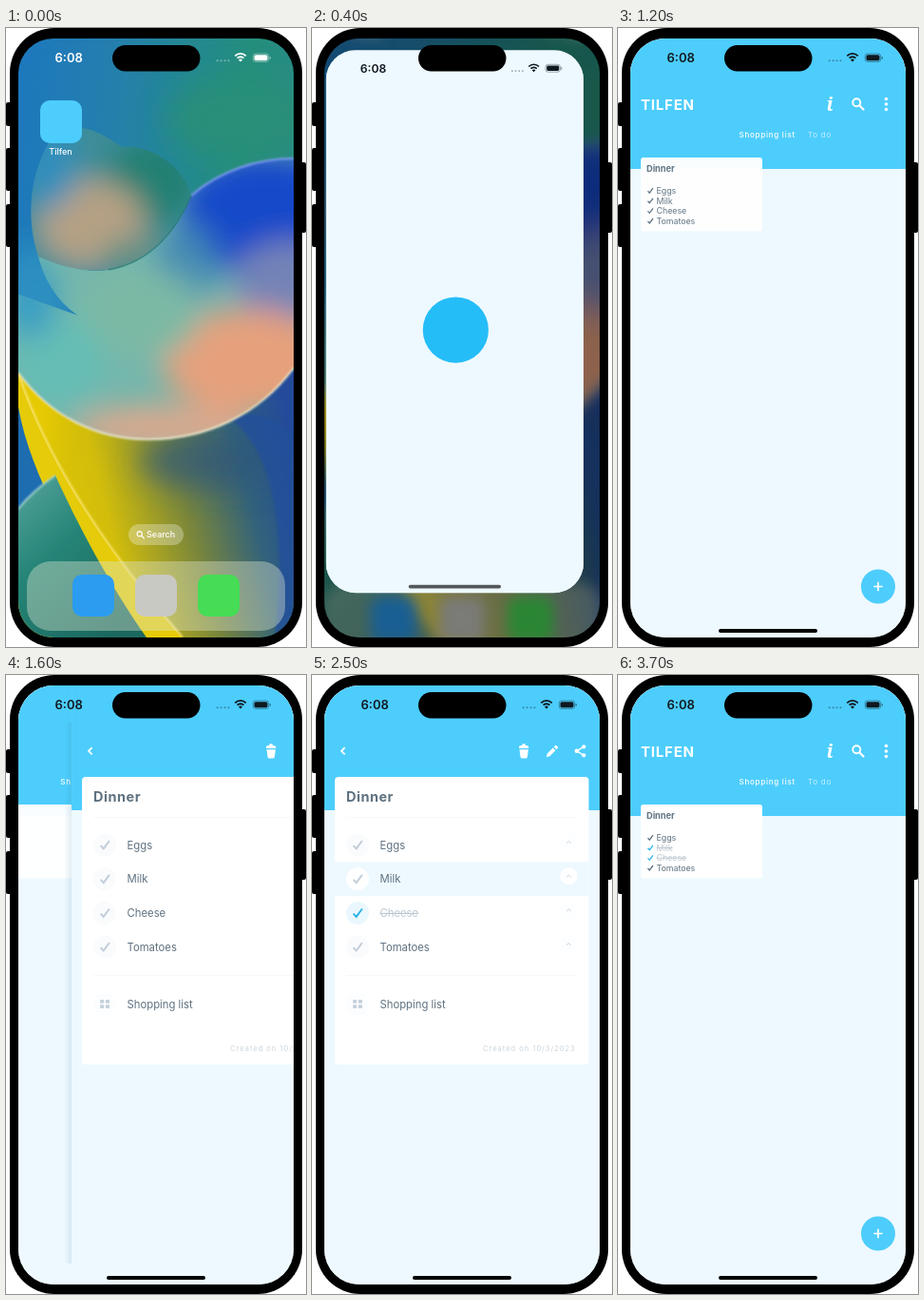
An HTML page that plays this animation: 316 by 650 pixels, repeating every 3.9 s.

```html
<!DOCTYPE html>
<html lang="en">
<head>
<meta charset="utf-8">
<title>Shopping list app</title>
<style>
  html, body { margin: 0; width: 100%; height: 100%; overflow: hidden; background: #fff; }
  svg { display: block; width: 100%; height: 100%; font-family: Inter, Roboto, sans-serif; }
</style>
</head>
<body>
<svg id="stage" viewBox="0 0 316 650"></svg>
<script>
const LOOP = 3900, STEP = 100;
const W = 290, H = 629, LEFT = 13, TOP = 11;
const SKY = '#4dcdfc', PALE = '#eef9ff', INK = '#5f7280', SOFT = '#bcc8d1', BLUE = '#2db5ea';
const ITEMS = ['Eggs', 'Milk', 'Cheese', 'Tomatoes'];
const NAME = 'Tilfen';

const rect = (x, y, w, h, fill, more = '') =>
  `<rect x="${x}" y="${y}" width="${w}" height="${h}" fill="${fill}" ${more}/>`;
const circle = (x, y, r, fill, more = '') =>
  `<circle cx="${x}" cy="${y}" r="${r}" fill="${fill}" ${more}/>`;
const text = (x, y, size, fill, str, more = '') =>
  `<text x="${x}" y="${y}" font-size="${size}" fill="${fill}" ${more}>${str}</text>`;
const line = (d, color, width, more = '') =>
  `<path d="${d}" fill="none" stroke="${color}" stroke-width="${width}" ${more}/>`;
const blob = (x, y, rx, ry, fill, opacity = 1) =>
  `<ellipse cx="${x}" cy="${y}" rx="${rx}" ry="${ry}" fill="${fill}" opacity="${opacity}"/>`;
const gradient = (id, coords, ...stops) =>
  `<linearGradient id="${id}" ${coords}>${stops.map(([at, color, alpha = 1]) =>
    `<stop offset="${at}" stop-color="${color}" stop-opacity="${alpha}"/>`).join('')}</linearGradient>`;
const clip = (id, shape) => `<clipPath id="${id}">${shape}</clipPath>`;

const tick = (x, y, s, color, width, more = '') =>
  line(`M${x - 4 * s} ${y + .6 * s}l${2.8 * s} ${3 * s}L${x + 4.4 * s} ${y - 4 * s}`, color, width, more);
const lens = (x, y, r, width) =>
  circle(x - r * .3, y - r * .3, r, 'none', `stroke="#fff" stroke-width="${width}"`) +
  line(`M${x + r * .5} ${y + r * .5}l${r} ${r}`, '#fff', width * 1.15, 'stroke-linecap="round"');

function status(color) {
  const arc = r => line(`M${247 - r * .72} ${35 - r * .7}a${r} ${r} 0 0 1 ${r * 1.44} 0`, color, 1.8);
  return text(51.5, 36, 13, color, '6:08', 'font-weight="600"') +
    [0, 1, 2, 3].map(i => circle(222.7 + i * 3.9, 34.3, 1, color, 'opacity=".4"')).join('') +
    arc(8) + arc(4.7) + `<path d="M247 35.6l-2-2.2a3 3 0 0 1 4 0z" fill="${color}"/>` +
    rect(260.3, 27, 16.4, 8.4, 'none', `rx="2.6" stroke="${color}" stroke-width=".8" opacity=".5"`) +
    rect(261.5, 28.2, 14, 6, color, 'rx="1.6"') + rect(277.6, 30, 1.2, 2.8, color, 'rx=".6" opacity=".5"');
}

const ORB = 'M13 362C45 406 94 432 150 432C210 432 266 407 303 357V137C265 137 225 150 195 176C182 205 152 246 108 254' +
  'C83 258 58 249 33 236C40 265 54 287 76 302L13 280Z';
const LOBE = 'M122 125C153 122 187 145 195 176C180 212 153 246 108 254C78 257 55 249 34 240C20 197 25 150 50 112C75 96 98 108 122 125Z';

function wallpaper() {
  const soft = (id, body) => `<g clip-path="url(#${id})"><g filter="url(#soft)">${body}</g></g>`;
  return rect(-20, -20, 356, 690, 'url(#sky)') +
    `<g filter="url(#soft)">${blob(250, 95, 80, 45, '#278f78', .9)}${blob(30, 285, 40, 60, '#3095c4', .8)}</g>` +
    rect(13, 360, W, 290, 'url(#ribbon)') +
    `<g filter="url(#soft)">${blob(30, 405, 18, 45, '#f0d000', .7)}${blob(215, 455, 75, 30, '#31577a', .7)}</g>` +
    line('M13 365C38 440 92 535 185 640', '#f4df61', 4, 'filter="url(#edge)"') +
    '<path d="M13 366C24 452 78 540 150 640H13Z" fill="#1d6db0"/>' +
    '<path d="M13 366C38 440 92 535 185 640H135C75 555 26 472 13 398Z" fill="#e5cb09"/>' +
    '<path d="M236 410C260 398 286 410 303 433V640H283C296 530 283 445 236 410Z" fill="#244f9c" opacity=".75" filter="url(#edge)"/>' +
    '<path d="M13 505Q28 486 52 470C75 520 108 583 148 640H13Z" fill="url(#leaf)"/>' +
    line('M13 505Q28 486 52 470', '#a5d5d1', 2, 'filter="url(#edge)"') +
    `<path d="${ORB}" fill="#74b6ac"/>` +
    soft('orb', blob(275, 195, 95, 65, '#1948c9') + blob(190, 245, 35, 45, '#3f86b4', .8) +
      blob(300, 265, 60, 42, '#7383b7') + blob(255, 350, 90, 55, '#e6a07c') +
      blob(140, 300, 65, 48, '#7cb9a5') + blob(165, 420, 95, 24, '#d9a98e') +
      blob(55, 350, 48, 48, '#65bdb5') + blob(25, 285, 28, 42, '#3b9fc3')) +
    line('M195 176C225 150 265 137 303 137', '#7b9af0', 2, 'filter="url(#edge)"') +
    line('M13 362C45 406 94 432 150 432C210 432 266 407 303 357', '#e8e4c8', 2, 'filter="url(#edge)"') +
    soft('lobe', rect(0, 80, 220, 200, '#3d8d99') + blob(155, 160, 50, 48, '#238073') +
      blob(90, 205, 56, 45, '#b5a184') + blob(45, 145, 28, 46, '#328ebc') + blob(135, 238, 35, 18, '#638f83')) +
    line('M195 176C180 212 153 246 108 254', '#267a72', 1.5, 'opacity=".7"');
}

function home() {
  const dock = ['#2b9cf0', '#c9c9c3', '#46dc55'];
  return wallpaper() + status('#fff') +
    `<g id="icon">${rect(36, 76, 44, 45, SKY, 'rx="10"')}</g>` +
    text(57.5, 132.5, 9, '#fff', NAME, 'text-anchor="middle" font-weight="500"') +
    rect(129, 521, 58, 22, '#fff', 'rx="11" opacity=".3"') + lens(141.5, 532, 2.6, 1.1) +
    text(148, 535.3, 9, '#fff', 'Search', 'font-weight="500"') +
    rect(22, 560, 272, 73, '#dfe5d0', 'rx="25" opacity=".4"') +
    dock.map((color, i) => rect(70 + i * 66, 574, 44, 44, color, 'rx="10"')).join('');
}

function listPage() {
  const rows = ITEMS.map((item, i) => `<g id="mini${i}"></g>`).join('');
  return rect(LEFT, TOP, W, H, PALE) + rect(LEFT, TOP, W, 137, SKY) +
    text(24, 85.5, 15, '#fff', NAME.toUpperCase(), 'font-weight="700" letter-spacing=".8"') +
    text(219.5, 87, 20, '#fff', 'i', 'font-family="Noto Serif, serif" font-weight="700" font-style="italic"') +
    lens(252.5, 79.5, 4, 1.9) +
    [74.5, 80, 85.5].map(y => circle(282.5, y, 1.8, '#fff')).join('') +
    text(127.5, 115, 8, '#fff', 'Shopping list', 'font-weight="500" letter-spacing=".75"') +
    text(200, 115, 8, '#fff', 'To do', 'opacity=".65" letter-spacing=".75"') +
    `<g id="card">${rect(24, 136, 128, 77.5, '#fff', 'rx="3"')}` +
    text(30, 151, 9.2, INK, 'Dinner', 'font-weight="700"') + rows + '</g>' +
    circle(274, 586.5, 18, SKY) + line('M269.3 586.5h9.4M274 581.8v9.4', '#fff', 1.7);
}

const miniRow = (i, done) => {
  const y = 174 + i * 10.6;
  return tick(34, y - 3.2, .65, done ? BLUE : INK, 1.3) +
    text(40.5, y, 8.8, done ? SOFT : INK, ITEMS[i], done ? 'text-decoration="line-through"' : '');
};

function row(i, done, pressed) {
  const y = 178.5 + i * 35.7;
  return (pressed ? rect(24, y - 18, 267.5, 36, PALE) : '') +
    circle(48, y, 12, pressed ? '#fff' : done ? '#ebf7fe' : '#f9fbfd') +
    tick(48, y, 1.1, done ? BLUE : '#c3ced8', 2) +
    text(71.5, y + 4.2, 11.3, done ? SOFT : INK, ITEMS[i], done ? 'text-decoration="line-through"' : '') +
    circle(270.5, y - 3, 9, pressed ? '#fff' : '#fdfeff') +
    line(`M268.3 ${y - 2}l2.2 -2l2.2 2`, '#c3ced8', 1);
}

function detailPage() {
  const bin = '<path d="M218 75.5q0-1.5 2-1.5h1l.8-1.7h2.6l.8 1.7h1q2 0 2 1.5v1.5h-10.2zM218.5 78.2h9.4l-1 7.7q-.3 1.6-2 1.6h-3.4q-1.7 0-2-1.6z" fill="#fff"/>';
  const pencil = '<path d="M246.8 86.2l1-3.7 6-6 2.7 2.7-6 6zM254.8 75.5l1.4-1.4q.8-.6 1.6.1l1 1q.7.8.1 1.6l-1.4 1.4z" fill="#fff"/>';
  const share = line('M286.3 75.3l-7.4 4.5 7.4 4.5', '#fff', 1.4) +
    circle(286.3, 75.3, 2.1, '#fff') + circle(278.9, 79.8, 2.3, '#fff') + circle(286.3, 84.3, 2.1, '#fff');
  const grid = [[43, 341], [48.8, 341], [43, 346.2], [48.8, 346.2]]
    .map(([x, y]) => rect(x, y, 4.2, 3.8, '#c6d1db', 'rx="1"')).join('');
  return rect(5, 50, 8, 568, 'url(#shade)') +
    rect(LEFT, TOP, W, H, PALE) + rect(LEFT, TOP, W, 131, SKY) +
    line('M34.6 76.2l-3.6 3.6 3.6 3.6', '#fff', 1.8) + bin + pencil + share +
    rect(24, 107, 267.5, 302, '#fff', 'rx="4"') +
    text(36, 133, 14.5, INK, 'Dinner', 'font-weight="700" letter-spacing=".5"') +
    rect(36, 149, 244, 1, '#f6f9fa') + '<g id="rows"></g>' + rect(36, 315, 244, 1, '#f6f9fa') +
    circle(48, 345.5, 12, '#fcfdfe') + grid + text(71.5, 349.7, 11.3, INK, 'Shopping list') +
    text(180, 395.3, 7.5, '#cbd5dd', 'Created on 10/3/2023', 'letter-spacing="1"');
}

const stage = document.getElementById('stage');
stage.innerHTML = '<defs>' +
  gradient('sky', 'x1="0" y1=".1" x2="1" y2=".3"', [0, '#1b75c2'], [.35, '#247fae'], [.75, '#258f7c'], [1, '#2c8790']) +
  gradient('ribbon', 'x1="0" y1=".5" x2="1" y2=".25"', [0, '#e8cb00'], [.3, '#d2bd0b'], [.58, '#78853c'], [.8, '#32627b'], [1, '#244b9b']) +
  gradient('leaf', 'x1="0" y1="0" x2=".7" y2="1"', [0, '#56a49c'], [.45, '#258477'], [1, '#1b685f']) +
  gradient('shade', '', [0, '#2b7395', 0], [1, '#2b7395', .13]) +
  '<filter id="soft" x="-30%" y="-30%" width="160%" height="160%"><feGaussianBlur stdDeviation="15"/></filter>' +
  '<filter id="edge" x="-10%" y="-10%" width="120%" height="120%"><feGaussianBlur stdDeviation="1"/></filter>' +
  clip('orb', `<path d="${ORB}"/>`) + clip('lobe', `<path d="${LOBE}"/>`) +
  clip('screen', rect(LEFT, TOP, W, H, '#000', 'rx="37"')) +
  clip('window', '<rect id="frame"/>') + '</defs>' +
  rect(4, 0, 308, 650, '#000', 'rx="47"') +
  [[0, 78, 25], [0, 126, 45], [0, 185, 45], [308, 141, 74]]
    .map(([x, y, h]) => rect(x, y, 8, h, '#000', 'rx="2"')).join('') +
  `<g clip-path="url(#screen)">
    <g id="home">${home()}</g>${rect(LEFT, TOP, W, H, '#000', 'id="dim"')}
    <g id="app" clip-path="url(#window)">
      <rect id="back"/>
      <g id="content">
        <g id="splash">${rect(LEFT, TOP, W, H, PALE)}${circle(159, 325, 37, '#25bdf8')}</g>
        <g id="list">${listPage()}</g>
        <g id="detail">${detailPage()}</g>
        ${status('#10191f')}
      </g>
      <g id="bar">${rect(93, -9, 104, 4, '#000', 'rx="2"')}</g>
    </g>
  </g>` + rect(112, 18, 92.5, 27.5, '#000', 'rx="13.7"');

const el = {};
for (const node of stage.querySelectorAll('[id]')) el[node.id] = node;

const mix = (a, b, p) => a + (b - a) * p;
const clamp = v => Math.min(1, Math.max(0, v));
const set = (node, attrs) => { for (const key in attrs) node.setAttribute(key, attrs[key]); };
const show = (node, on) => { node.style.display = on ? '' : 'none'; };

// Critically damped spring from 0 to 1; rate is per millisecond.
function spring(ms, rate) {
  const x = Math.max(0, ms) * rate;
  const p = 1 - (1 + x) * Math.exp(-x);
  return p > .993 ? 1 : p;
}

function drawWindow(t) {
  const p = spring(t - 100, .0141), grow = Math.pow(p, 1.35);
  const w = mix(44, W, p), h = mix(45, H, grow);
  const x = mix(58, 158, p) - w / 2, y = mix(98.5, 325.5, p) - h / 2, s = w / W;
  const box = { x, y, width: w, height: h };
  show(el.app, p > 0);
  show(el.home, p < 1);
  show(el.icon, p === 0);
  set(el.frame, { ...box, rx: mix(10, p < 1 ? 33 : 0, p) });
  set(el.back, { ...box, fill: PALE });
  set(el.content, {
    transform: `translate(${x} ${y}) scale(${s}) translate(${-LEFT} ${-TOP})`,
    opacity: clamp(p * 2.2)
  });
  set(el.bar, { transform: `translate(${x} ${y + h}) scale(${s})`, opacity: p < 1 ? p * .7 : 1 });
  set(el.home, { transform: `translate(158 325) scale(${1 + .1 * p}) translate(-158 -325)` });
  el.home.style.filter = p > 0 && p < 1 ? `blur(${7 * p}px)` : 'none';
  set(el.dim, { opacity: p < 1 ? .42 * p : 0 });
}

function drawPages(t) {
  const p = t < 3100 ? spring(t - 1400, .0152) : 1 - spring(t - 3133, .0152);
  show(el.list, t >= 900 && p < 1);
  show(el.splash, t < 1100);
  show(el.detail, p > 0);
  set(el.list, { transform: `translate(${-.3 * W * p} 0)`, opacity: clamp((t - 800) / 300) });
  set(el.detail, { transform: `translate(${W * (1 - p)} 0)` });
  set(el.card, { opacity: t < 3600 ? .97 : 1 });
}

function drawItems(t) {
  const done = [false, t >= 2700, t >= 2300, false];
  const pressed = [false, t >= 2500 && t < 2700, t >= 2100 && t < 2300, false];
  el.rows.innerHTML = ITEMS.map((item, i) => row(i, done[i], pressed[i])).join('');
  ITEMS.forEach((item, i) => { el['mini' + i].innerHTML = miniRow(i, done[i]); });
}

let last = -1;
const start = performance.now();
function tickClock(now) {
  const t = Math.floor((Math.max(0, now - start) % LOOP) / STEP) * STEP;
  if (t !== last) {
    last = t;
    drawWindow(t);
    drawPages(t);
    drawItems(t);
  }
  requestAnimationFrame(tickClock);
}
tickClock(start);
</script>
</body>
</html>
```
